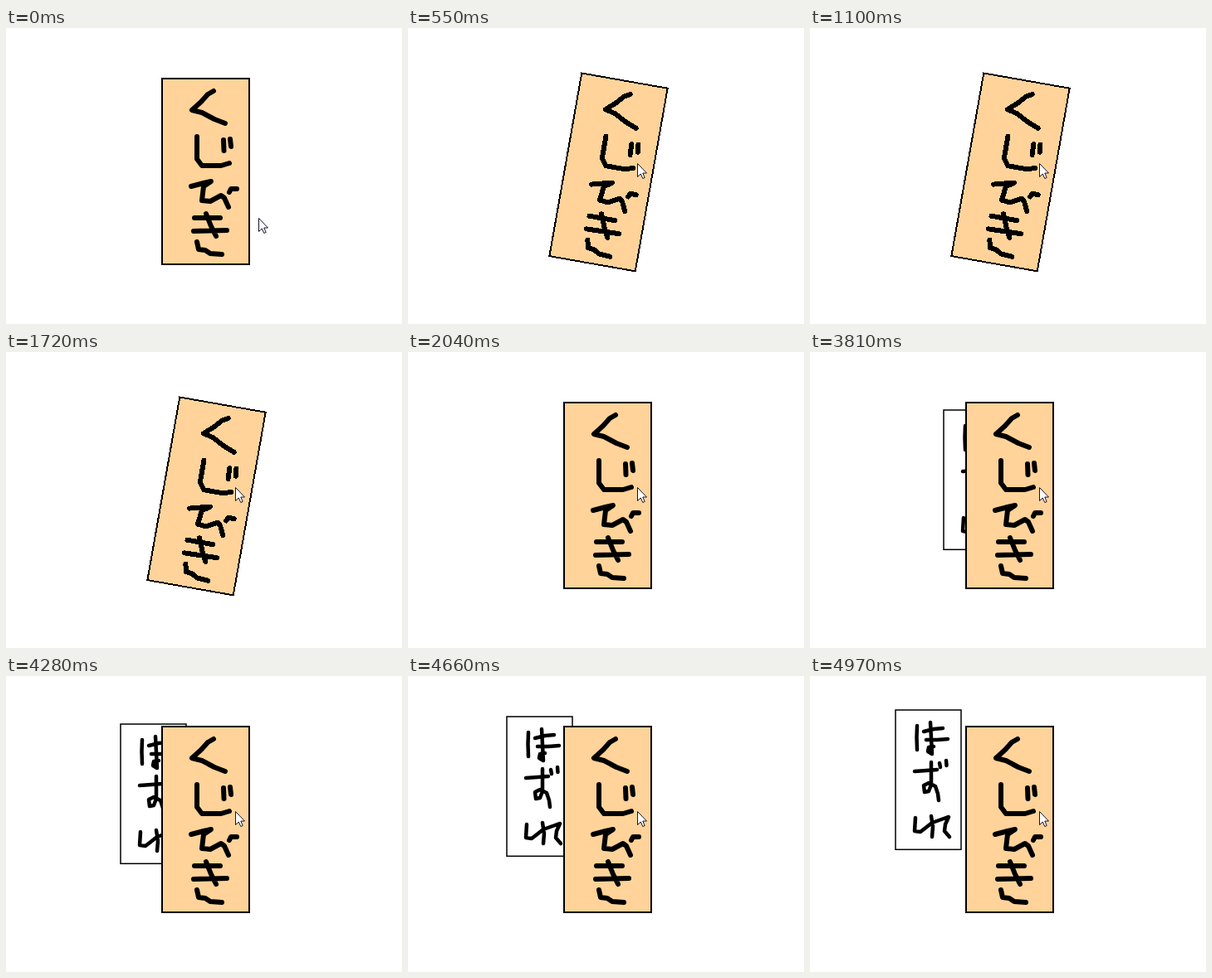
Recreate the animation shown at these times as an HTML page. Size 477 px wide and 357 px high, loop 5.05 s.

```html
<!DOCTYPE html>
<html lang="ja">
<head>
<meta charset="utf-8">
<title>くじびき</title>
<style>
  html, body { margin: 0; width: 100%; height: 100%; overflow: hidden; background: #fff; }
  svg { display: block; width: 477px; height: 357px; }
  .ink { fill: none; stroke: #000; stroke-linecap: round; stroke-linejoin: round; }
</style>
</head>
<body>
<svg viewBox="0 0 477 357">
  <g id="slip" visibility="hidden">
    <rect width="79" height="168.300" fill="#fff" stroke="#000" stroke-width="1.500"/>
    <g class="ink" stroke-width="4.500" transform="translate(-103 -41)">
      <path d="M129 60L128.500 74L129 89M137 67L149 64L160 63M140 77L153 77L166 76M145 56L146 75L147 94L142 91L143 86L149 85"/>
      <path d="M126 115L140 114L153 113M146 104L146 131L143 139L138 140L137 132L143 129L151 133L154 142L155 150M156 105L157 110M164 102L164.500 108"/>
      <path d="M127 171L126 187L133 188L147 177L161 172L167 170L163 179L162 187L168 194M146 169L148 182L147 194"/>
    </g>
  </g>
  <g id="box">
    <rect x="188" y="61" width="105" height="224" fill="#ffd399" stroke="#000" stroke-width="2"/>
    <g class="ink" stroke-width="6">
      <path d="M250 76L243 80L235 89L224 99L236 102L251 110L264 115"/>
      <path d="M230 131V158L236 166H259L269 163M262 135L262.500 148M270 134L271 143"/>
      <path d="M223 191L238 187L247 185L238 191L236 208L246 209L259 202L263 205L268 216M269 198L271 194L278 194"/>
      <path d="M227 229L258 229M226 245L266 244M241 224L247 239L253 251M230 258L232 267L240 268L246 272L260 273"/>
    </g>
  </g>
  <path id="cursor" d="M.5 .5V16.500L4.300 13L6.800 18.500L9.200 17.500L6.800 12H11.500Z" fill="#fff" stroke="#14142a"/>
</svg>
<script>
const LOOP = 5050, STEP = 540 / 7;
const [slip, box, cursor] = ['slip', 'box', 'cursor'].map(id => document.getElementById(id));
const pointer = [[0, 304, 229], [70, 290, 196], [150, 276, 163]];
const swings = [550, 780, 1100, 1400, 1720, 2040, 2420, 2740];

const move = (el, x, y) => el.setAttribute('transform', `translate(${x} ${y})`);

function draw(t) {
  const [, px, py] = pointer.filter(p => p[0] <= t).pop();
  move(cursor, px, py);

  // every swing time flips between upright and tilted
  const tilted = swings.filter(s => s <= t).length % 2 === 1;
  box.setAttribute('transform', tilted ? 'translate(1 1) rotate(10 241 173)' : '');
  box.setAttribute('shape-rendering', tilted ? 'crispEdges' : 'auto');

  // the slip slides out up and to the left in 22 equal steps
  const k = Math.min(21, Math.floor((t - 3350 + 4) / STEP));
  slip.setAttribute('visibility', k < 0 ? 'hidden' : 'visible');
  move(slip, Math.round(103 + (21 - k) * 3.88), Math.round(41 + (21 - k) * 1.93));
}

const start = performance.now();
function tick() {
  draw((performance.now() - start) % LOOP);
  requestAnimationFrame(tick);
}
tick();
</script>
</body>
</html>
```
